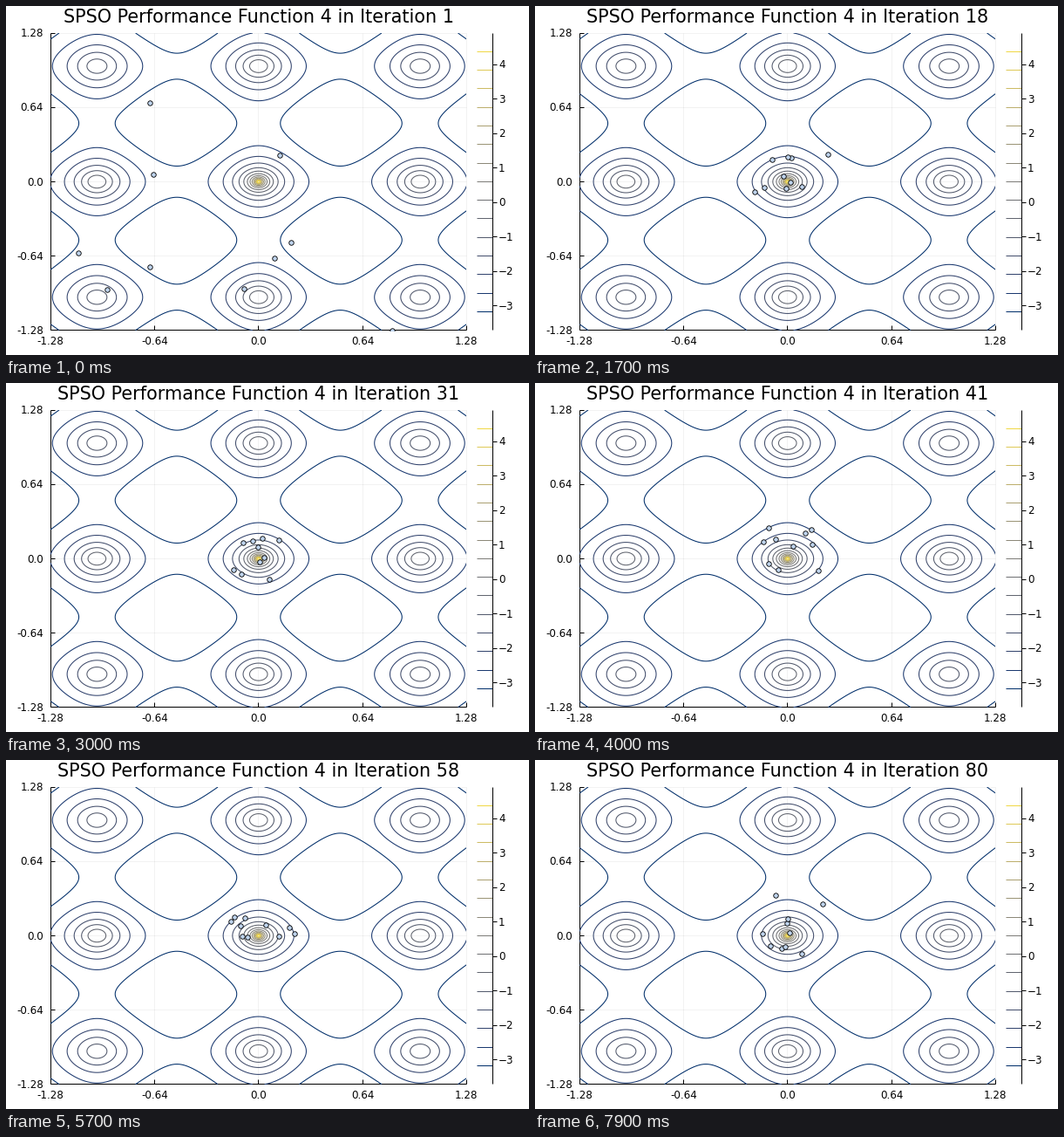
Recreate the animation shown at these times as a matplotlib script. Size 600 px wide and 400 px high, loop 8 s.

```python
import numpy as np
import matplotlib.pyplot as plt
from matplotlib.animation import FuncAnimation

plt.rcParams["font.family"] = "DejaVu Sans"

W, H, DPI = 600, 400, 100
LEFT, RIGHT, TOP, BOTTOM = 51.2, 528.3, 31.0, 371.7
CX, CY = (LEFT + RIGHT) / 2, (TOP + BOTTOM) / 2
BAR_LEFT, BAR_RIGHT = 540, 558
LIM = 1.28
FRAMES, INTERVAL = 80, 100
PX = 72 / DPI
TITLE_PX, TICK_PX = 20.75, 11.85

# Where the particles start, in axis units
START = np.array([
    (-0.67, 0.68), (0.13, 0.23), (-0.65, 0.06), (-1.11, -0.61), (-0.93, -0.93),
    (-0.67, -0.73), (-0.09, -0.92), (0.10, -0.66), (0.20, -0.52), (0.82, -1.28),
])


def swarm_path():
    """Particles are pulled to the optimum and kicked at random."""
    rng = np.random.default_rng(4)
    inertia, pull = 0.6, 0.8
    home, kick = np.array([0.0, 0.05]), np.array([0.06, 0.065])
    pos, vel = START, np.zeros_like(START)
    path = [pos]
    for _ in range(FRAMES - 1):
        vel = (inertia * vel - pull * (pos - home)
               + kick * rng.standard_t(4, pos.shape))
        pos = np.clip(pos + vel, -LIM, LIM)
        path.append(pos)
    return np.array(path)


def label(x, y, text, size, ha):
    return fig.text(x / W, 1 - y / H, text, ha=ha, va="baseline",
                    fontsize=size * PX, color="black")


def stroke(x0, y0, x1, y1, color="black", width=1.0, alpha=1.0):
    # Half a pixel less, so that snapping keeps the line on its own pixel
    x, y = np.array([x0, x1]) - 0.5, np.array([y0, y1]) - 0.5
    fig.add_artist(plt.Line2D(x / W, 1 - y / H, lw=width * PX, color=color,
                              alpha=alpha, solid_capstyle="butt", zorder=-1))


def stage_x(v):
    return CX + v / LIM * (RIGHT - LEFT) / 2


def stage_y(v):
    return CY - v / LIM * (BOTTOM - TOP) / 2


def bar_y(v):
    return BOTTOM - (v - lo) / (hi - lo) * (BOTTOM - TOP)


fig = plt.figure(figsize=(W / DPI, H / DPI), dpi=DPI, facecolor="white")
ax = fig.add_axes([LEFT / W, 1 - BOTTOM / H,
                   (RIGHT - LEFT) / W, (BOTTOM - TOP) / H])
ax.set(xlim=(-LIM, LIM), ylim=(-LIM, LIM))
ax.axis("off")

# Negative log of the Rastrigin function
g = np.linspace(-LIM, LIM, 300)
wave = g ** 2 - 10 * np.cos(2 * np.pi * g) + 10
Z = -np.log(wave[:, None] + wave[None, :])
lo, hi = Z.min(), Z.max()
levels = np.linspace(lo, hi, 17)[1:-1]
cmap = plt.get_cmap("cividis")
ax.contour(g, g, Z, levels=levels, cmap=cmap, vmin=lo, vmax=hi,
           linewidths=1.05 * PX, linestyles="solid", zorder=2)

# Grid, axis lines, ticks and labels
for v in np.linspace(-LIM, LIM, 5):
    x, y = stage_x(v), stage_y(v)
    stroke(x, TOP, x, BOTTOM, width=0.5, alpha=0.1)
    stroke(LEFT, y, RIGHT, y, width=0.5, alpha=0.1)
    stroke(x, BOTTOM, x, BOTTOM - 5)
    stroke(LEFT, y, LEFT + 5, y)
    text = f"{v:.2f}" if v else "0.0"
    label(x, 387.5, text, TICK_PX, "center")
    label(43, y + 4.3, text, TICK_PX, "right")
stroke(LEFT, BOTTOM, RIGHT, BOTTOM)
stroke(LEFT, TOP, LEFT, BOTTOM)

# Colour scale
for v in levels:
    stroke(BAR_LEFT, bar_y(v), BAR_RIGHT, bar_y(v), cmap((v - lo) / (hi - lo)))
stroke(BAR_RIGHT, TOP, BAR_RIGHT, BOTTOM)
for v in range(-3, 5):
    stroke(BAR_RIGHT, bar_y(v), BAR_RIGHT + 5, bar_y(v))
    label(565, bar_y(v) + 4, str(v).replace("-", "\u2212"), TICK_PX, "left")

title = label(CX, 18.8, "", TITLE_PX, "center")
dots, = ax.plot([], [], "o", ms=5.5 * PX, mfc=(0.75, 0.83, 0.93), mec="black",
                mew=0.85 * PX, zorder=5)
path = swarm_path()


def update(i):
    title.set_text(f"SPSO Performance Function 4 in Iteration {i + 1}")
    dots.set_data(path[i, :, 0], path[i, :, 1])
    return title, dots


anim = FuncAnimation(fig, update, frames=FRAMES, interval=INTERVAL,
                     init_func=lambda: update(0), repeat=True, repeat_delay=0)
plt.show()
```
